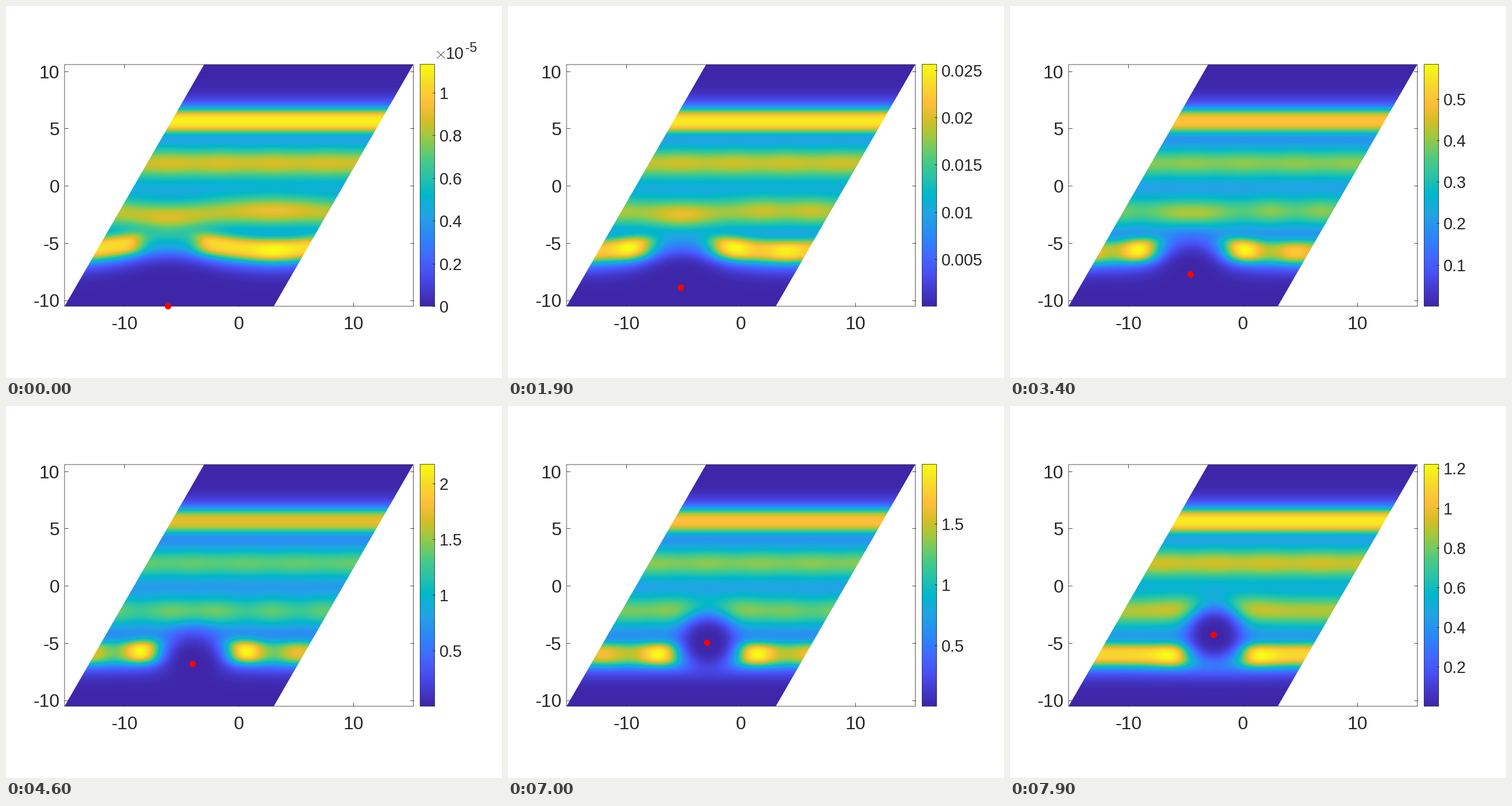
Recreate the animation shown at these times as a matplotlib script. Size 864 px wide and 648 px high, loop 8 s.

```python
import math

import numpy as np
import matplotlib.pyplot as plt
from matplotlib.animation import FuncAnimation
from matplotlib.colors import LinearSegmentedColormap
from matplotlib.patches import Circle, Polygon, Rectangle

W, H = 864, 648
STEPS = 27
INK = "#262626"
LEFT, RIGHT, TOP, BOTTOM = 102, 709.5, 102, 523
PERIOD = 364.5
BAR_LEFT, BAR_RIGHT, BAR_TOP = 721.3, 746.7, 101.5
PLATEAU = 0.33

PARULA = LinearSegmentedColormap.from_list("parula", [
    (0, "#3E26A8"), (8 / 63, "#484DF0"), (13 / 63, "#4269FE"), (17 / 63, "#2F81FA"),
    (24 / 63, "#20A5E3"), (29 / 63, "#01B8CA"), (33 / 63, "#24C1AE"), (38 / 63, "#4ACB84"),
    (44 / 63, "#9DC943"), (48 / 63, "#D1BF27"), (53 / 63, "#FEBE3C"), (58 / 63, "#F7DC2A"),
    (1, "#F9FB15")])

# The logarithm of the colour limit is a smooth curve through a few key points
LOG_PEAK = np.polyfit([0, 7, 12, 16, 20, 24, 27],
                      np.log([1.133e-5, 0.02564, 0.583, 2.17, 3.118, 1.989, 1.22]), 6)


def bell(d, sigma):
    return np.exp(-0.5 * (d / sigma) ** 2)


def flat_bell(d):
    return np.exp(-np.abs(d / 20.5) ** 2.8)


def rise(d):
    return 1 / (1 + np.exp(-d / 9))


def dot_position(s):
    return 282.3 + 2.685 * s, 523 - 4.61 * s


def density(s):
    """Four rows of particles around a fixed one, scaled to a maximum of one."""
    p = s / STEPS
    order = math.sin(math.pi * p ** 1.7)  # how strongly the rows break into spots
    start = math.exp(-s / 2.5)
    dot_x, dot_y = dot_position(s)
    x = np.arange(102, 710)[None, :] + 0.5
    y = np.arange(102, 523)[:, None] + 0.5
    u = np.abs((x - dot_x - 1.5 + PERIOD / 2) % PERIOD - PERIOD / 2)
    wave = 2 * math.pi / PERIOD

    # Bottom row: spots beside the dot and opposite to it, emptied next to it
    edge = (0.96 - 0.26 * order - PLATEAU
            + (0.1 * p + 0.53 * order) * bell(u - 91 + 13 * p ** 8, 22)
            + (0.08 * (1 - p) + 0.3 * order) * bell(u - PERIOD / 2, 25))
    edge = edge * (1 - 0.75 * np.exp(-(u / 54) ** 4))
    edge_y = 418.5 + 16 * p - (7 - 8 * p) * np.cos(wave * u)

    # Third row: a spot above the dot that splits into two as the dot comes near
    split = max(0, 3.2 * (s - 4))
    far_u, far_width = 138 + 44 * start, 24 + 20 * start
    row = (0.75 - 0.08 * order - PLATEAU
           + (0.03 + 0.11 * order) * (bell(u - split, 30) + bell(u + split, 30))
           + (0.04 * (1 - p) + 0.1 * order)
           * (bell(u - far_u, far_width) + bell(u - PERIOD + far_u, far_width))
           - 0.25 * p ** 6 * bell(u, 30))
    row_y = 357.5 + (10 - 16 * p) * bell(u, 55)

    field = (PLATEAU * rise(y - 168) * rise(edge_y + 32 - y)
             + 0.68 * flat_bell(y - 200)
             + (0.45 + 0.01 * np.cos(4 * wave * u)) * bell(y - 273.5, 19)
             + 0.04 * bell(y - 313, 25)
             + row * bell(y - row_y, 19)
             + edge * flat_bell(y - edge_y))

    hole = max(51, 87 - 1.7 * s)
    field = field * (1 - np.exp(-(np.hypot(u, y - dot_y) / hole) ** 3.5))
    return field / field.max()


def bar_ticks(peak):
    """Leading digits of the limit, tick step, first tick and power of ten."""
    power = math.floor(math.log10(peak))
    lead = peak / 10 ** power
    step = next(k for k in (0.2, 0.5, 1, 2) if lead / k <= 7.5)
    first = 0 if peak < 2e-5 else 1
    return lead, step, first, power


fields = [density(s) for s in range(STEPS + 1)]

plt.rcParams["font.family"] = "Liberation Sans"
fig = plt.figure(figsize=(W / 72, H / 72), dpi=72, facecolor="white")
ax = fig.add_axes([0, 0, 1, 1])
ax.axis("off")


def line(xs, ys, z):
    return ax.plot(xs, ys, color=INK, lw=0.8, zorder=z)[0]


def label(x, y, text, size, ha="center"):
    return ax.text(x, y, text, size=size, color=INK, ha=ha, va="baseline", zorder=6)


def frame_box(x0, x1, y0, y1):
    ax.add_patch(Rectangle((x0, y0), x1 - x0, y1 - y0, fill=False, ec=INK, lw=0.8,
                           snap=False, zorder=4))


def show_image(data, left, right, top):
    return ax.imshow(data, cmap=PARULA, vmin=0, vmax=1, aspect="auto",
                     extent=(left, right, BOTTOM, top), interpolation="nearest", zorder=2)


picture = show_image(fields[0], 102, 710, 102)
show_image(np.linspace(1, 0, 256)[:, None], BAR_LEFT, BAR_RIGHT, BAR_TOP)
ax.set(xlim=(0, W), ylim=(H, 0))
cell = Polygon([(LEFT, BOTTOM), (LEFT + PERIOD, BOTTOM), (RIGHT, TOP), (RIGHT - PERIOD, TOP)],
               transform=ax.transData)
picture.set_clip_path(cell)

frame_box(LEFT, RIGHT, TOP, BOTTOM)
frame_box(BAR_LEFT, BAR_RIGHT, BAR_TOP, BOTTOM)
for value in (-10, 0, 10):
    tx = 405.5 + 19.93 * value
    line([tx, tx], [BOTTOM, BOTTOM - 6], 1)
    line([tx, tx], [TOP, TOP + 6], 1)
    label(tx + 0.5, 563, str(value), 32)
for value in range(-10, 11, 5):
    ty = 313 - 19.95 * value
    line([LEFT, LEFT + 6], [ty, ty], 1)
    line([RIGHT, RIGHT - 6], [ty, ty], 1)
    label(93.5, ty + 12, str(value), 32, "right")

marks = [line([BAR_RIGHT - 4, BAR_RIGHT], [0, 0], 5) for _ in range(8)]
mark_labels = [label(755, 0, "", 28.8, "left") for _ in range(8)]
exponent = label(800, 80, "", 23, "left")
power_parts = [line([751, 764], [79, 91], 6), line([751, 764], [91, 79], 6),
               label(766, 92, "10", 28.8, "left"), exponent]
dot = ax.add_patch(Circle((0, 0), 5.6, fc="red", ec="none", zorder=7))


def update(i):
    s = (i + 2) // 3
    picture.set_data(fields[s])
    dot.center = dot_position(s)

    lead, step, first, power = bar_ticks(math.exp(np.polyval(LOG_PEAK, s)))
    scaled = power < -2
    unit = 1 if scaled else 10.0 ** power
    for k, (mark, text) in enumerate(zip(marks, mark_labels), start=first):
        value = k * step
        y = BOTTOM - (BOTTOM - BAR_TOP) * value / lead
        mark.set_ydata([y, y])
        text.set_y(y + 11)
        text.set_text(f"{value * unit:g}")
        for part in (mark, text):
            part.set_visible(value <= lead)
    for part in power_parts:
        part.set_visible(scaled)
    exponent.set_text(str(power))
    return [picture, dot, *marks, *mark_labels, *power_parts]


anim = FuncAnimation(fig, update, frames=80, interval=100, repeat=True, repeat_delay=0)
plt.show()
```
